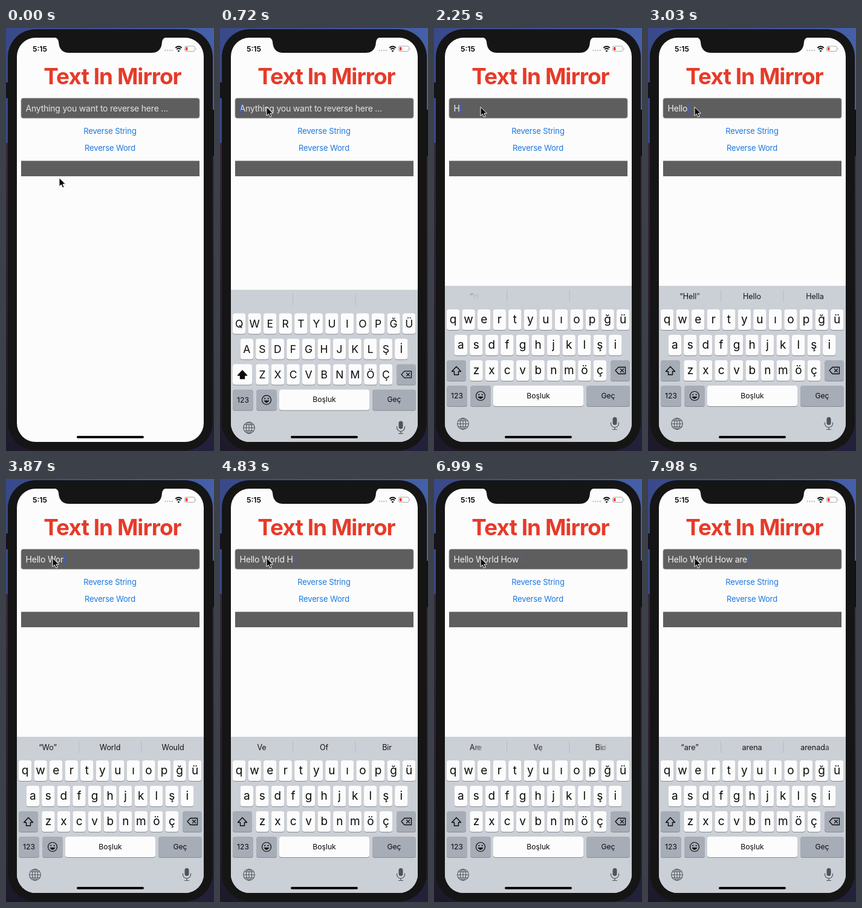
These frames come from a looping animation (344x699 px, 8 s). An HTML page:

```html
<!DOCTYPE html>
<html lang="en">
<head>
<meta charset="utf-8">
<title>Text In Mirror</title>
<style>
html, body { margin: 0; width: 100%; height: 100%; overflow: hidden; background: #151515; }
svg { display: block; width: 100vw; height: 100vh; }
text { font-family: Inter, Roboto, sans-serif; white-space: pre; }
.mid { text-anchor: middle; }
.title { font-size: 37px; font-weight: 700; letter-spacing: -1px; fill: #e63b2a; }
.clock { font-size: 12.2px; font-weight: 600; }
.field { font-size: 14px; letter-spacing: -.21px; fill: #f0f0f0; }
.link { font-size: 13px; letter-spacing: -.15px; fill: #1c78e0; }
.letter { fill: #0a0a0a; }
.label { font-size: 12.2px; fill: #0a0a0a; }
.hint { font-size: 12.6px; letter-spacing: -.1px; fill: #141416; }
</style>
</head>
<body>
<svg viewBox="0 0 344 699" preserveAspectRatio="xMinYMin meet">
  <defs>
    <clipPath id="screen"><rect x="18" y="16" width="309" height="668" rx="31"/></clipPath>
    <linearGradient id="sky">
      <stop offset="0" stop-color="#39498a"/><stop offset="1" stop-color="#4560a8"/>
    </linearGradient>
    <linearGradient id="left" x2="0" y2="1">
      <stop offset="0" stop-color="#38283a"/><stop offset="1" stop-color="#1c1a2a"/>
    </linearGradient>
    <linearGradient id="right" x2="0" y2="1">
      <stop offset="0" stop-color="#4a2832"/><stop offset="1" stop-color="#22203a"/>
    </linearGradient>
  </defs>

  <rect width="344" height="699" fill="#1c1a2a"/>
  <rect width="344" height="190" fill="url(#sky)"/>
  <rect y="90" width="60" height="26" fill="#141420"/>
  <rect y="190" width="60" height="509" fill="url(#left)"/>
  <rect x="300" y="135" width="44" height="77" fill="#101018"/>
  <rect x="300" y="212" width="44" height="487" fill="url(#right)"/>
  <rect x="3" y="2" width="339" height="696" rx="46" fill="#151515"/>
  <rect x="18" y="16" width="309" height="668" rx="31" fill="#fcfcfc"/>
  <path d="M79 15Q86 16 87 23Q88 41 105 41H241Q257 41 258 23Q259 16 266 15Z" fill="#151515"/>

  <text class="clock" x="44" y="39">5:15</text>
  <g fill="#c9c3b8">
    <circle cx="263.500" cy="37" r="1.2"/><circle cx="267.300" cy="37" r="1.2"/>
    <circle cx="271.100" cy="37" r="1.2"/><circle cx="274.900" cy="37" r="1.2"/>
  </g>
  <g fill="none" stroke="#0a0a0a" stroke-width="2">
    <path d="M280.300 32.700Q285.500 28.300 290.700 32.700M282.300 35.200Q285.500 32.400 288.700 35.200"/>
    <path d="M284.100 37.400L285.500 38.400L286.900 37.400" stroke-width="1.7"/>
  </g>
  <rect x="295.500" y="30" width="17" height="8.500" rx="2.500" fill="none" stroke="#adaaa8"/>
  <rect x="297" y="31.500" width="3.500" height="5.500" rx="1" fill="#ee3f30"/>
  <path d="M314 32.500Q315.800 34.200 314 36Z" fill="#adaaa8"/>

  <text class="title mid" x="176" y="93">Text In Mirror</text>
  <rect x="25" y="116" width="295" height="33" rx="3.500" fill="#5e5e5e" stroke="#999" stroke-width=".8"/>
  <text id="entry" class="field" x="32.500" y="137.500"></text>
  <rect id="caret" y="124" width="1.600" height="17" fill="#3d62c4"/>
  <text class="link mid" x="172" y="175">Reverse String</text>
  <text class="link mid" x="172" y="203">Reverse Word</text>
  <rect x="25" y="219.500" width="295" height="25.500" fill="#5e5e5e"/>

  <g clip-path="url(#screen)">
    <g id="board"><rect x="18" y="426" width="309" height="258" fill="#cbcfd6"/></g>
  </g>
  <rect x="117" y="674" width="111" height="4" rx="2" fill="#080808"/>
  <path id="mouse" d="M0 0V14.500L3.400 11.400L5.700 16.600L8.200 15.500L5.900 10.500H10.500Z" fill="#0a0a0a" stroke="#fafafa" stroke-width="1"/>
</svg>
<script>
const LOOP = 8000, INK = '#0a0a0a', PALE = '#fcfcfc', GREY = '#a7adb7';
const $ = id => document.getElementById(id);
const board = $('board'), entry = $('entry'), caret = $('caret'), mouse = $('mouse');

function add(parent, tag, attrs, text) {
  const el = document.createElementNS('http://www.w3.org/2000/svg', tag);
  for (const k in attrs) el.setAttribute(k, attrs[k]);
  if (text) el.textContent = text;
  return parent.appendChild(el);
}

function key(x, y, w, fill) {
  add(board, 'rect', { x, y: y + 1, width: w, height: 34, rx: 4, fill: '#878a90' });
  return add(board, 'rect', { x, y, width: w, height: 34, rx: 4, fill });
}

const label = (x, y, text) => add(board, 'text', { x, y, class: 'label mid' }, text);
const line = (d, width = 1.2, stroke = INK) =>
  add(board, 'path', { d, fill: 'none', stroke, 'stroke-width': width, 'stroke-linejoin': 'round', 'stroke-linecap': 'round' });

const upper = add(board, 'g', {}), lower = add(board, 'g', {});
const rows = [
  ['QWERTYUIOPĞÜ', 'qwertyuıopğü', 31.6, 465],
  ['ASDFGHJKLŞİ', 'asdfghjklşi', 44.3, 507],
  ['ZXCVBNMÖÇ', 'zxcvbnmöç', 70, 549]
];
for (const [caps, small, x0, y] of rows) {
  [...caps].forEach((c, i) => {
    const x = x0 + i * 25.55;
    key(x - 10.7, y, 21.4, PALE);
    add(upper, 'text', { x, y: y + 23.5, class: 'letter mid', 'font-size': 17.5 }, c);
    add(lower, 'text', { x, y: y + 23, class: 'letter mid', 'font-size': 19 }, small[i]);
  });
}
// letters sit above the key caps
board.append(upper, lower);

const shift = key(21, 549, 32, GREY);
const arrow = line('M37 559.500L44.500 567.500H40.500V573H33.500V567.500H29.500Z', 1.4);
key(292, 549, 32, GREY);
line('M300 566L305 560.500H316.500V571.500H305ZM308.500 563.500L313.500 568.500M313.500 563.500L308.500 568.500', 1.3);
key(21, 591, 34, GREY);
key(60, 591, 34, GREY);
key(98, 591, 149, PALE);
key(252, 591, 72, GREY);
label(38, 612, '123');
label(172.5, 611.5, 'Boşluk');
label(288, 611.5, 'Geç');

// smiley, globe and microphone
add(board, 'circle', { cx: 77, cy: 608, r: 7.5, fill: 'none', stroke: INK, 'stroke-width': 1.2 });
add(board, 'circle', { cx: 74.3, cy: 605.8, r: 1.1, fill: INK });
add(board, 'circle', { cx: 79.7, cy: 605.8, r: 1.1, fill: INK });
add(board, 'path', { d: 'M72.500 609H81.500Q77 616.500 72.500 609Z', fill: INK });
const dim = '#505359';
for (const rx of [9.3, 4.6])
  add(board, 'ellipse', { cx: 48, cy: 654, rx, ry: 9.3, fill: 'none', stroke: dim, 'stroke-width': 1.1 });
line('M48 644.700V663.300M38.700 654H57.300M40.500 649H55.500M40.500 659H55.500', 1, dim);
add(board, 'rect', { x: 295.5, y: 643, width: 7, height: 13, rx: 3.5, fill: dim });
line('M292.500 652V653.500A6.500 6.500 0 0 0 305.500 653.500V652M299 660V663.500M295.500 663.500H302.500', 1.2, dim);

line('M120.500 433V452M224 433V452', 0.8, '#b2b6bf');
const hintSet = () => [69, 172, 276].map(x => add(board, 'text', { x, y: 447.5, class: 'hint mid' }));
const oldHints = hintSet(), newHints = hintSet();

const FOCUS = 420, PHRASE = 'Hello World How are';
const presses = [2140, 2360, 2570, 2750, 2960, 3180, 3440, 3640, 3830, 4030, 4220, 4440,
  4780, 5000, 5240, 6700, 7230, 7460, 7690];
const hints = [
  [0, ''],
  [2220, '“H”'],
  [2450, '“He”|Her|Hem'],
  [2670, '“Hel”|Hello|Help'],
  [2850, '“Hell”|Hello|Hella'],
  [3060, '“Hello”'],
  [3280, 'World|Kitty|Ve'],
  [3500, '“W”|We|What'],
  [3690, '“Wo”|World|Would'],
  [3920, '“Wor”|World|Work'],
  [4120, '“Worl”|World|Worlds'],
  [4310, '“World”'],
  [4540, 'Ve|Of|Bir'],
  [4870, '“H”'],
  [5090, '“Ho”|How|Hoş'],
  [5330, '“How”'],
  [6760, 'Ne|Aç|Bu'],
  [6910, 'Are|Ve|Biri'],
  [7320, '“a”|Ama|And'],
  [7550, '“ar”|are|arena'],
  [7780, '“are”|arena|arenada']
];

const clamp = v => Math.max(0, Math.min(1, v));
const ease = v => v * v * (3 - 2 * v);

// each word appears or leaves letter by letter, from the left
function setHints(nodes, text, age, leaving) {
  const words = text.split('|');
  nodes.forEach((node, i) => {
    node.textContent = '';
    [...(words[i] || '')].forEach((c, n) => {
      const shown = clamp((age - n * 22) / 90);
      add(node, 'tspan', { 'fill-opacity': leaving ? 1 - shown : shown }, c);
    });
  });
}

function draw(t) {
  const move = ease(clamp((t - 50) / 360));
  mouse.setAttribute('transform', `translate(${88 - 11 * move} ${247.5 - 117 * move})`);

  const rise = 1 - clamp((t - 460) / 370);
  board.setAttribute('transform', `translate(0 ${258 * rise ** 3})`);

  const count = presses.filter(p => p <= t).length;
  entry.textContent = count ? PHRASE.slice(0, count) : 'Anything you want to reverse here ...';
  entry.setAttribute('opacity', count ? 1 : 0.9);
  const since = t - (count ? presses[count - 1] : FOCUS);
  caret.setAttribute('x', 33 + (count ? entry.getComputedTextLength() : 0));
  caret.setAttribute('opacity', since >= 0 && since % 1000 < 500 ? 1 : 0);

  upper.setAttribute('display', count ? 'none' : 'inline');
  lower.setAttribute('display', count ? 'inline' : 'none');
  shift.setAttribute('fill', count ? GREY : PALE);
  arrow.setAttribute('fill', count ? 'none' : INK);

  const at = hints.filter(h => h[0] <= t).length - 1;
  const age = t - hints[at][0];
  setHints(oldHints, at ? hints[at - 1][1] : '', age, true);
  setHints(newHints, hints[at][1], age, false);
}

const start = performance.now();
function tick() {
  draw((performance.now() - start) % LOOP);
  requestAnimationFrame(tick);
}
tick();
</script>
</body>
</html>
```
